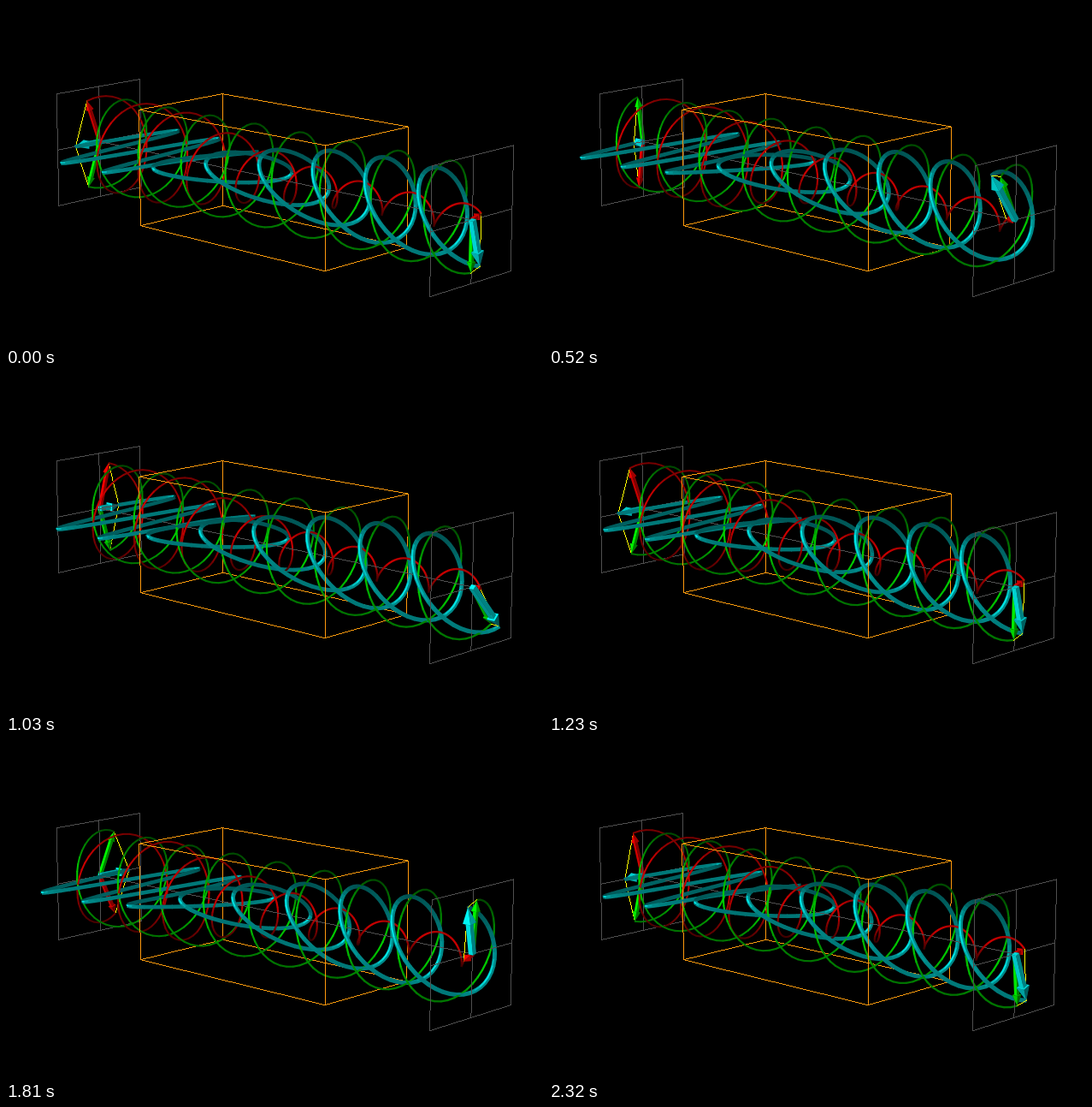
A matplotlib script that plays this animation: 628x396 px, repeating every 2380 ms.

```python
import numpy as np
import matplotlib.pyplot as plt
from matplotlib.animation import FuncAnimation
from matplotlib.collections import LineCollection, PolyCollection

W, H, DPI = 628, 396, 100
TICK = 10
HOLDS = [200, 130, 60, 130, 130, 60, 200, 60, 60, 200, 60,
         200, 60, 130, 130, 60, 130, 130, 130, 60, 60]
STARTS = np.cumsum([0] + HOLDS[:-1])
STEPS = np.arange(len(HOLDS))
PHASES = np.interp(STEPS, [0, 4, 9, 12, 15, 17, 20],
                   [0, 152, 323.5, 434, 545, 614, 714.5])

TURNS = 8
LENGTH = 8.0            # beam length in units of the plane's half side
AMP = 0.83
BOX = (0.25, 0.75)


def unit(v):
    return np.array(v) / np.linalg.norm(v)


TUBE_LIGHT = unit([0.6, 0.25, -0.75])
ARROW_LIGHT = unit([0.25, 0.45, -0.86])

RED = np.array([1.0, 0, 0])
GREEN = np.array([0, 1.0, 0])
CYAN = np.array([0, 1.0, 1.0])
YELLOW = (1, 1, 0)
ORANGE = np.array([1.0, 0.6, 0.05])
GREY = np.array([0.31, 0.31, 0.31])

# Cross sections of the scene on screen: front top, back top, back bottom, front bottom
SQUARE = [(1, -1), (1, 1), (-1, 1), (-1, -1)]
SECTIONS = {
    0.0: [(58, 102), (157, 85), (157, 211), (62, 233)],
    0.25: [(155, 121), (253, 102), (253, 233), (157, 256)],
    0.75: [(373, 163), (470, 140), (468, 282), (373, 309)],
    1.0: [(498, 186), (593, 163), (590, 309), (495, 339)],
}


def fit_camera():
    """Least-squares perspective camera through the cross sections."""
    rows, rhs = [], []
    for x, corners in SECTIONS.items():
        for (y, z), (px, py) in zip(SQUARE, corners):
            u, v = (px - W / 2) / 300, (py - H / 2) / 300
            p = [x, y, z, 1]
            rows.append(p + [0] * 4 + [-u * x, -u * y, -u * z])
            rows.append([0] * 4 + p + [-v * x, -v * y, -v * z])
            rhs += [u, v]
    m = np.linalg.lstsq(np.array(rows, float), np.array(rhs), rcond=None)[0]
    return np.append(m, 1).reshape(3, 4)


CAMERA = fit_camera()


def project(points):
    """Screen position and depth of points (x, y, z)."""
    p = np.asarray(points, float)
    h = np.concatenate([p, np.ones(p.shape[:-1] + (1,))], axis=-1) @ CAMERA.T
    depth = h[..., 2]
    xy = h[..., :2] / depth[..., None] * 300 + [W / 2, H / 2]
    return xy, depth


def points_px(px):
    return np.asarray(px) * 72 / DPI


def pixel_line(a, b):
    """One-pixel staircase between two scene points: runs and their depths."""
    (p, q), (da, db) = project([a, b])
    d = q - p
    m = np.argmax(np.abs(d))
    lo, hi = sorted(np.rint([p[m], q[m]]))
    u = np.arange(lo, hi + 1)
    t = (u - p[m]) / d[m]
    v = np.rint(p[1 - m] + t * d[1 - m])
    cuts = np.flatnonzero((np.diff(v) != 0) | (u[1:] % 12 == 0)) + 1
    first = np.append(0, cuts)
    last = np.append(cuts, len(u)) - 1
    runs = np.empty((len(first), 2, 2))
    runs[:, 0, m] = u[first] - 0.5
    runs[:, 1, m] = u[last] + 0.5
    runs[:, :, 1 - m] = v[first][:, None]
    return runs, da + (db - da) * (t[first] + t[last]) / 2


def line(a, b, color):
    runs, depth = pixel_line(a, b)
    n = len(runs)
    return runs, depth, np.broadcast_to(color, (n, 3)), np.ones(n)


def tube(points, colors, width, shift=(0, 0), lift=0.0):
    """Slightly overlapping pieces: segments, depths, colours, widths."""
    xy, depth = project(points)
    xy = xy + shift
    over = 0.05 * np.diff(xy, axis=0)
    segs = np.stack([xy[:-1] - over, xy[1:] + over], axis=1)
    mid = (depth[:-1] + depth[1:]) / 2
    return segs, mid - lift, colors, width / mid


def fixed_lines():
    parts = [line((0, 0, 0), (1, 0, 0), GREY)]
    for x in (0, 1):
        for i in range(4):
            parts.append(line((x, *SQUARE[i]), (x, *SQUARE[i - 1]), GREY))
        parts.append(line((x, -1, 0), (x, 1, 0), GREY))
        parts.append(line((x, 0, -1), (x, 0, 1), GREY))
    for i in range(4):
        for x in BOX:
            parts.append(line((x, *SQUARE[i]), (x, *SQUARE[i - 1]), ORANGE))
        parts.append(line((BOX[0], *SQUARE[i]), (BOX[1], *SQUARE[i]), ORANGE))
    return parts


def waves(x, phase):
    """Transverse (y, z) vectors of the green and red waves along x."""
    x = np.asarray(x, float)
    s = np.clip((x - BOX[0]) / (BOX[1] - BOX[0]), 0, 1)
    base = 2 * np.pi * TURNS * x + np.radians(-110.5 - phase)
    g = base + np.radians(20) * s
    r = -(base + np.radians(95) * s)
    fade = AMP * np.exp(-1.3 * s)
    green = np.stack([AMP * np.sin(g), AMP * np.cos(g)], axis=-1)
    red = np.stack([fade * np.sin(r), fade * np.cos(r)], axis=-1)
    return green, red


def facing(points):
    """How squarely each piece of a tube meets the light, 0 to 1."""
    t = np.diff(points, axis=0) * [LENGTH, 1, 1]
    t /= np.linalg.norm(t, axis=1)[:, None]
    return 1 - (t @ TUBE_LIGHT) ** 2


def tubes(phase):
    x = np.linspace(0, 1, 40 * TURNS + 1)
    green, red = waves(x, phase)
    parts = []
    for vec, color in ((green, GREEN), (red, RED)):
        pts = np.column_stack([x, vec])
        f = facing(pts)
        shade = 0.2 + 0.45 * f + 0.15 * np.clip((f - 0.85) / 0.15, 0, 1)
        parts.append(tube(pts, shade[:, None] * color, 2.0))
    pts = np.column_stack([x, green + red])
    f = facing(pts)
    shade = np.minimum(0.22 + 0.48 * f, 0.53)
    glow = shade + 0.38 * np.clip((f - 0.65) / 0.33, 0, 1)
    parts.append(tube(pts, shade[:, None] * CYAN, 4.4))
    parts.append(tube(pts, glow[:, None] * CYAN, 1.8, (-0.9, -0.5), 0.006))
    return parts


def arrow(x, vec, shaft, color):
    """Faces of a square arrow from the axis at x: polygons, depths, colours."""
    size = np.hypot(*vec)
    head = min(3.2 * shaft, size / 2)
    half = shaft / 2
    d = np.array([0, *vec]) / size
    e1 = np.array([1.0, 0, 0])
    e2 = np.cross(d, e1)

    def ring(dist, r):
        return [d * dist + r * (a * e1 + b * e2)
                for a, b in ((1, 1), (1, -1), (-1, -1), (-1, 1))]

    neck = size - head
    tail, end, base = ring(0, half), ring(neck, half), ring(neck, 1.75 * half)
    tip = d * size
    solids = [
        (d * neck / 2,
         [tail] + [[tail[i], tail[i - 1], end[i - 1], end[i]] for i in range(4)]),
        (d * (neck + head / 4),
         [base] + [[base[i], base[i - 1], tip, tip] for i in range(4)]),
    ]
    faces = []
    for core, polys in solids:
        for poly in polys:
            poly = np.array(poly)
            n = unit(np.cross(poly[1] - poly[0], poly[2] - poly[0]))
            if n @ (poly.mean(axis=0) - core) < 0:
                n = -n
            shade = min(1, 0.33 + 0.7 * max(0, n @ ARROW_LIGHT))
            xy, depth = project(poly / [LENGTH, 1, 1] + [x, 0, 0])
            faces.append((xy, depth.mean(), shade * color))
    return faces


def vectors(x, phase):
    """Arrow faces, back to front, and the parallelogram's two lines."""
    green, red = waves(x, phase)
    total = green + red
    thin = arrow(x, green, 0.055, GREEN) + arrow(x, red, 0.055, RED)
    thick = arrow(x, total, 0.08, CYAN)
    faces = [f for group in (thin, thick) for f in sorted(group, key=lambda f: -f[1])]
    sides = [pixel_line((x, *v), (x, *total))[0] for v in (green, red)]
    return [f[0] for f in faces], [f[2] for f in faces], np.concatenate(sides)


FIXED = fixed_lines()


def build(phase):
    cols = [np.concatenate(c) for c in zip(*(FIXED + tubes(phase)))]
    order = np.argsort(-cols[1], kind="stable")
    segs, _, colors, widths = [c[order] for c in cols]
    return segs, colors, points_px(widths), [vectors(x, phase) for x in (0, 1)]


SCENES = [build(p) for p in PHASES]

fig = plt.figure(figsize=(W / DPI, H / DPI), dpi=DPI, facecolor="black")
ax = fig.add_axes([0, 0, 1, 1])
ax.set_xlim(-0.5, W - 0.5)
ax.set_ylim(H - 0.5, -0.5)
ax.axis("off")


def line_layer(z, **style):
    layer = LineCollection([], capstyle="butt", zorder=z, **style)
    layer.set_snap(False)
    ax.add_collection(layer, autolim=False)
    return layer


beam = line_layer(3)
ends = []
for z in (1, 5):
    sides = line_layer(z, colors=[YELLOW], linewidths=points_px(1))
    solid = PolyCollection([], linewidths=0, zorder=z + 0.5)
    ax.add_collection(solid, autolim=False)
    ends.append((solid, sides))


def update(frame):
    k = np.searchsorted(STARTS, frame * TICK, side="right") - 1
    segs, colors, widths, pairs = SCENES[k]
    beam.set_segments(segs)
    beam.set_color(colors)
    beam.set_linewidth(widths)
    for (solid, sides), (polys, shades, edges) in zip(ends, pairs):
        solid.set_verts(polys)
        solid.set_facecolor(shades)
        sides.set_segments(edges)
    return [beam]


anim = FuncAnimation(fig, update, frames=sum(HOLDS) // TICK, interval=TICK,
                     init_func=lambda: update(0), repeat=True, repeat_delay=0,
                     cache_frame_data=False)
plt.show()
```
